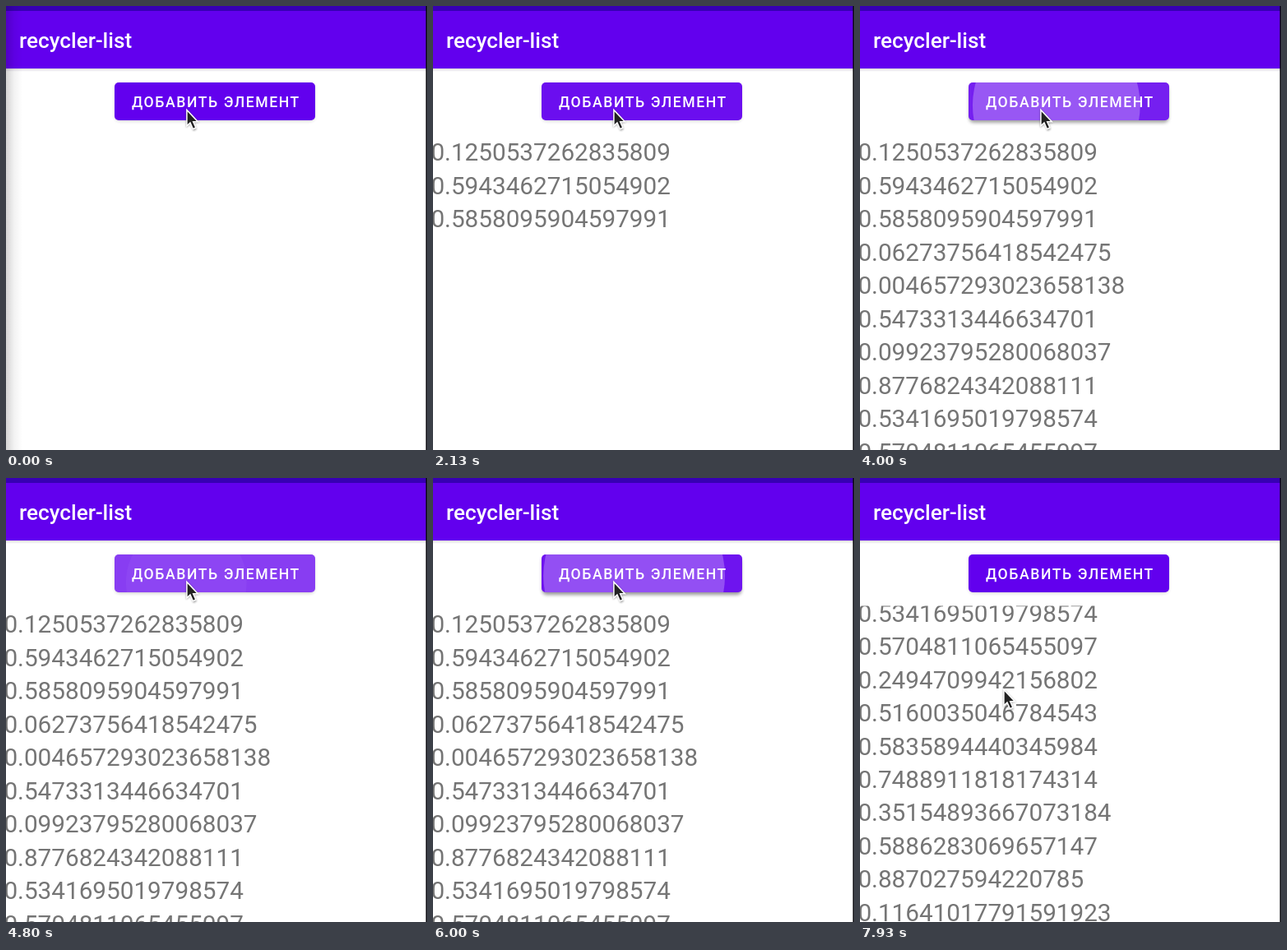
Recreate the animation shown at these times as an HTML page. Size 512x540 px, loop 8 s.

```html
<!DOCTYPE html>
<html lang="ru">
<head>
<meta charset="utf-8">
<title>recycler-list</title>
<style>
  html, body { margin: 0; width: 100%; height: 100%; overflow: hidden; background: #fff; }
  svg { display: block; width: 512px; height: 540px; }
  text { font-family: Roboto, "Noto Sans", sans-serif; white-space: pre; }
  .bar { font-size: 26.2px; font-weight: 500; fill: #fff; }
  .label { font-size: 17.6px; font-weight: 500; letter-spacing: 0.089em; fill: #fff; }
  .row { font-size: 29.7px; fill: #757575; }
</style>
</head>
<body>
<svg viewBox="0 0 512 540" xmlns="http://www.w3.org/2000/svg">
  <defs>
    <clipPath id="listClip"><rect y="155.5" width="512" height="385"/></clipPath>
    <clipPath id="buttonClip"><rect x="132" y="93" width="244" height="46" rx="5"/></clipPath>
    <linearGradient id="edgeFade">
      <stop offset="0" stop-color="#000" stop-opacity=".17"/>
      <stop offset=".5" stop-color="#000" stop-opacity=".05"/>
      <stop offset="1" stop-color="#000" stop-opacity="0"/>
    </linearGradient>
    <linearGradient id="barFade" x2="0" y2="1">
      <stop offset="0" stop-color="#000" stop-opacity=".14"/>
      <stop offset="1" stop-color="#000" stop-opacity="0"/>
    </linearGradient>
    <filter id="soft" x="-20%" y="-50%" width="140%" height="200%"><feGaussianBlur stdDeviation="2.2"/></filter>
    <filter id="arrowSoft" x="-60%" y="-50%" width="220%" height="200%"><feGaussianBlur stdDeviation="1.3"/></filter>
  </defs>

  <rect width="512" height="540" fill="#fff"/>
  <g clip-path="url(#listClip)"><g id="list"></g></g>

  <rect y="76" width="512" height="4" fill="url(#barFade)"/>
  <rect width="512" height="76" fill="#6200ee"/>
  <rect width="512" height="6" fill="#3700b3"/>
  <text class="bar" x="16" y="50.5">recycler-list</text>

  <rect id="shadow" x="133" y="94" width="242" height="45" rx="5" filter="url(#soft)"/>
  <rect x="132" y="93" width="244" height="46" rx="5" fill="#6200ee"/>
  <g id="ripples" clip-path="url(#buttonClip)" fill="#fff"></g>
  <text class="label" x="153" y="122.8">ДОБАВИТЬ ЭЛЕМЕНТ</text>

  <rect id="edge" width="20" height="540" fill="url(#edgeFade)"/>
  <rect x="510.6" width="1.4" height="540" fill="#0a0a0f"/>

  <g id="cursor">
    <path d="M0 1V24L5 20 9 28 13 26 10 18H16Z" fill="#000" opacity=".35" filter="url(#arrowSoft)"/>
    <path d="M.9 2.4V21.8L5 18.1 8.3 25.6 11.9 24 8.7 16.7H14.4Z" fill="#222" stroke="#fff" stroke-width="1.5"/>
  </g>
</svg>
<script>
const LOOP = 8000, PITCH = 40.46, BASE = 188.4, SCROLL = 337.4;
const START = { x: 219, y: 124 };
const values = [
  "0.1250537262835809", "0.5943462715054902", "0.5858095904597991",
  "0.06273756418542475", "0.004657293023658138", "0.5473313446634701",
  "0.09923795280068037", "0.8776824342088111", "0.5341695019798574",
  "0.5704811065455097", "0.2494709942156802", "0.5160035046784543",
  "0.5835894440345984", "0.7488911818174314", "0.35154893667073184",
  "0.5886283069657147", "0.887027594220785", "0.11641017791591923"
];

// A few slow presses, then steady tapping
const presses = [400, 1190, 1790, 2190, 2590];
for (let i = 0; i < 15; i++) presses.push(2826 + 218 * i + 3.5 * Math.max(0, i - 9));
const hold = i => i === 0 ? 240 : 110;

const $ = id => document.getElementById(id);
const clamp = v => Math.min(1, Math.max(0, v));
const span = (t, from, to) => clamp((t - from) / (to - from));
const mix = (a, b, k) => a + (b - a) * k;
const smooth = k => k * k * (3 - 2 * k);

function add(parent, name, attrs) {
  const el = document.createElementNS("http://www.w3.org/2000/svg", name);
  for (const key in attrs) el.setAttribute(key, attrs[key]);
  return parent.appendChild(el);
}

// cubic-bezier(.4, 0, .2, 1)
function standard(x) {
  let lo = 0, hi = 1, s = 0.5;
  for (let i = 0; i < 20; i++) {
    s = (lo + hi) / 2;
    const bx = 1.2 * s * (1 - s) ** 2 + 0.6 * s * s * (1 - s) + s ** 3;
    if (bx < x) lo = s; else hi = s;
  }
  return smooth(s);
}

const rows = values.map((value, i) => {
  const el = add($("list"), "text", { class: "row", x: -2.6, y: BASE + i * PITCH });
  el.textContent = value;
  return el;
});
const ripples = presses.map(() => add($("ripples"), "circle", {}));

function drawButton(t) {
  let lift = 0;
  presses.forEach((down, i) => {
    const age = t - down, up = hold(i), fade = Math.max(225, up);
    const alpha = age < 0 ? 0 : 0.25 * clamp(age / 75) * (1 - span(age, fade, fade + 150));
    const grow = standard(clamp(age / 225));
    const circle = ripples[i];
    circle.setAttribute("cx", mix(219, 254, grow));
    circle.setAttribute("cy", mix(127, 116, grow));
    circle.setAttribute("r", mix(73, 124, grow));
    circle.setAttribute("opacity", alpha);
    lift = Math.max(lift, clamp(age / 100) * (1 - span(age, up + 20, up + 120)));
  });
  $("shadow").setAttribute("transform", `translate(0 ${mix(0.8, 3, lift)})`);
  $("shadow").setAttribute("opacity", mix(0.2, 0.42, lift));
}

function cursorAt(t) {
  const go = smooth(span(t, 6220, 6720));
  const drag = smooth(span(t, 6870, 7350));
  const back = smooth(span(t, 7560, 7920));
  return {
    x: mix(START.x, 185, go) - 3 * drag - 8 * back,
    y: mix(START.y, 345, go) - 288 * drag + 198 * back
  };
}

function draw(t) {
  $("edge").setAttribute("visibility", t < 330 ? "visible" : "hidden");
  rows.forEach((row, i) => {
    const shown = t >= presses[i] + hold(i) + 20;
    row.setAttribute("visibility", shown ? "visible" : "hidden");
  });
  const scroll = SCROLL * smooth(span(t, 6880, 7640) ** 0.85);
  $("list").setAttribute("transform", `translate(0 ${-scroll})`);
  drawButton(t);
  const c = cursorAt(t);
  $("cursor").setAttribute("transform", `translate(${c.x} ${c.y})`);
}

const begin = performance.now();
function tick() {
  draw((performance.now() - begin) % LOOP);
  requestAnimationFrame(tick);
}
tick();
</script>
</body>
</html>
```
